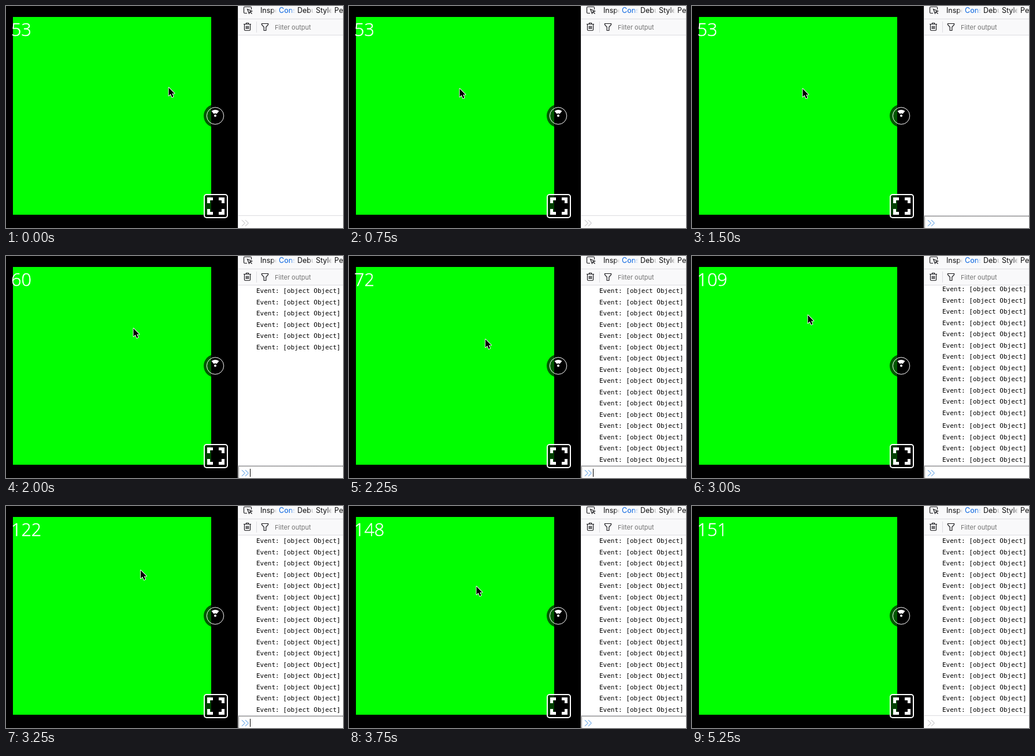
These frames come from a looping animation (583 by 385 pixels, 5750 ms). An HTML page:

```html
<!DOCTYPE html>
<html lang="en">
<head>
<meta charset="utf-8">
<title>Event console</title>
<style>
  html, body { margin: 0; width: 100%; height: 100%; overflow: hidden; background: #000; }
  svg { display: block; }
  text { white-space: pre; }
  .count { font: 300 30.5px "Open Sans", "Noto Sans", sans-serif; fill: #fff; stroke: #fff; stroke-width: .5; }
  .tab { font: 12.5px Inter, "Liberation Sans", sans-serif; fill: #0c0c0d; }
  .active { fill: #0060df; }
  .filter { font: 11px Inter, "Liberation Sans", sans-serif; fill: #737373; }
  .log { font: 11px "DejaVu Sans Mono", "Liberation Mono", monospace; fill: #000; }
</style>
</head>
<body>
<svg id="stage" width="583" height="385" viewBox="0 0 583 385">
  <defs>
    <linearGradient id="fade">
      <stop offset="0" stop-color="#f9f9fa" stop-opacity="0"/>
      <stop offset="1" stop-color="#f9f9fa"/>
    </linearGradient>
  </defs>

  <rect width="583" height="385"/>
  <rect x="12" y="19" width="343" height="343" fill="#0f0"/>
  <text id="count" class="count" x="9" y="52"></text>

  <g id="compass">
    <circle cx="362" cy="190.5" r="20" fill-opacity=".65"/>
    <circle cx="362" cy="190.5" r="14.7" fill="none" stroke="#fff"/>
    <path d="M355.5 182.3Q362 177.5 368.5 182.3L364.5 187Q362 185.6 359.5 187Z" fill="#fff"/>
    <circle cx="362" cy="190.3" r="2" fill="#fff"/>
  </g>

  <g id="fullscreen">
    <rect x="343" y="327" width="40" height="40" rx="4" fill-opacity=".75" stroke="#fff" stroke-width="2"/>
    <path d="M350.5 342V334.5H358M368 334.5H375.5V342M375.5 352V359.5H368M358 359.5H350.5V352"
      fill="none" stroke="#fff" stroke-width="5"/>
  </g>

  <g id="panel">
    <rect x="402" width="181" height="385" fill="#fff"/>
    <rect x="401" width="1" height="385" fill="#e0e0e2"/>
    <rect x="402" width="181" height="50" fill="#f9f9fa"/>
    <path d="M402 22.5H583M402 50.5H583M433.5 27V46M402 363.5H583" stroke="#dcdce0"/>
    <g id="tabs"></g>
    <g fill="none" stroke="#1b1b1e" stroke-width="1.2">
      <path d="M417 12.5H413Q411.5 12.5 411.5 11V3Q411.5 1.5 413 1.5H423Q424.5 1.5 424.5 3V6"/>
      <path d="M417.5 5.5L425.5 9L422 10L420.5 13Z"/>
      <path d="M422 10L425.5 13.5"/>
      <path d="M411 31.5H424M415.5 31V29.5H419.5V31M412.5 32V41Q412.5 42.5 414 42.5H421Q422.5 42.5 422.5 41V32M415.5 34.5V40M417.5 34.5V40M419.5 34.5V40"/>
      <path d="M442.5 30.5H453.5V32.5L449.8 36.5V42.5H446.2V36.5L442.5 32.5Z"/>
    </g>
    <text class="filter" x="465" y="41">Filter output</text>
    <g id="rows"></g>
    <path id="focus" d="M402 364.5H583M402.5 364V385" stroke="#000" stroke-dasharray="1 1"/>
    <path id="prompt" d="M408 371.2L413.3 376.5L408 381.8M414 371.2L419.3 376.5L414 381.8" fill="none"/>
    <rect id="caret" x="422" y="369" width="1" height="14"/>
  </g>

  <path id="cursor" d="M0 0V14L3.3 11.1L5.7 16.7L8.1 15.6L5.8 10.2H10Z"
    stroke="#fff" stroke-width="1.8" stroke-linejoin="round" paint-order="stroke"/>
</svg>
<script>
const LOOP = 5750, STEP = 250;
const byId = id => document.getElementById(id);

function add(parent, tag, attrs, text = "") {
  const node = document.createElementNS("http://www.w3.org/2000/svg", tag);
  for (const key in attrs) node.setAttribute(key, attrs[key]);
  node.textContent = text;
  return parent.appendChild(node);
}

["Inspe", "Conso", "Debug", "Style", "Pe"].forEach((label, i) => {
  const x = 440 + 32 * i, tabs = byId("tabs");
  add(tabs, "rect", { x: x - 4, width: 32, height: 22, fill: "#f9f9fa" });
  add(tabs, "text", { x, y: 12, class: i === 1 ? "tab active" : "tab" }, label);
  if (i < 4) add(tabs, "rect", { x: x + 19, width: 9, height: 22, fill: "url(#fade)" });
});

const rows = Array.from({ length: 16 }, () =>
  add(byId("rows"), "text", { x: 433, class: "log" }, "Event: [object Object]"));

// Pointer positions: start time, x, y
const moves = [
  [0, 281.5, 141.5], [250, 279.5, 141.5], [500, 193.5, 144], [750, 191.5, 143.5],
  [2000, 220.5, 125.5], [2250, 236, 144.5], [2500, 213, 155.5], [2750, 193.5, 130.5],
  [3000, 200.5, 102.5], [3250, 233, 111.5], [3500, 226, 128.5], [3750, 220.5, 139.5]
];

// Counts a little faster with every step
function countAt(t) {
  if (t < 2000) return 53;
  if (t >= 4500) return 151;
  const steps = Math.floor((Math.min(t, 3750) - 2000) / STEP);
  return Math.round(60 + 12.05 * steps + 0.07 * steps * steps);
}

const within = (t, from, to) => t >= from && t < to;
const show = (node, on) => node.setAttribute("visibility", on ? "visible" : "hidden");

function render(t) {
  byId("count").textContent = countAt(t);

  const [, x, y] = moves.filter(m => m[0] <= t).pop();
  byId("cursor").setAttribute("transform", `translate(${x} ${y})`);
  show(byId("cursor"), t < 4500);

  const visible = t < 2000 ? 0 : t < 2250 ? 6 : 16;
  const scrolling = within(t, 3000, 3250);
  rows.forEach((row, i) => {
    row.setAttribute("y", 64 + Math.round(i * 19.5) - (scrolling && i < 12 ? 3 : 0));
    show(row, i < visible);
  });

  const focused = within(t, 1000, 5250);
  show(byId("focus"), focused);
  byId("prompt").setAttribute("stroke", focused ? "#2f86e0" : "#b0b0b4");
  show(byId("caret"), within(t, 1000, 1500) || within(t, 2000, 2750) ||
    within(t, 3250, 3750) || within(t, 4500, 5000));
}

const start = performance.now();
function tick() {
  render((performance.now() - start) % LOOP);
  requestAnimationFrame(tick);
}
tick();
</script>
</body>
</html>
```
